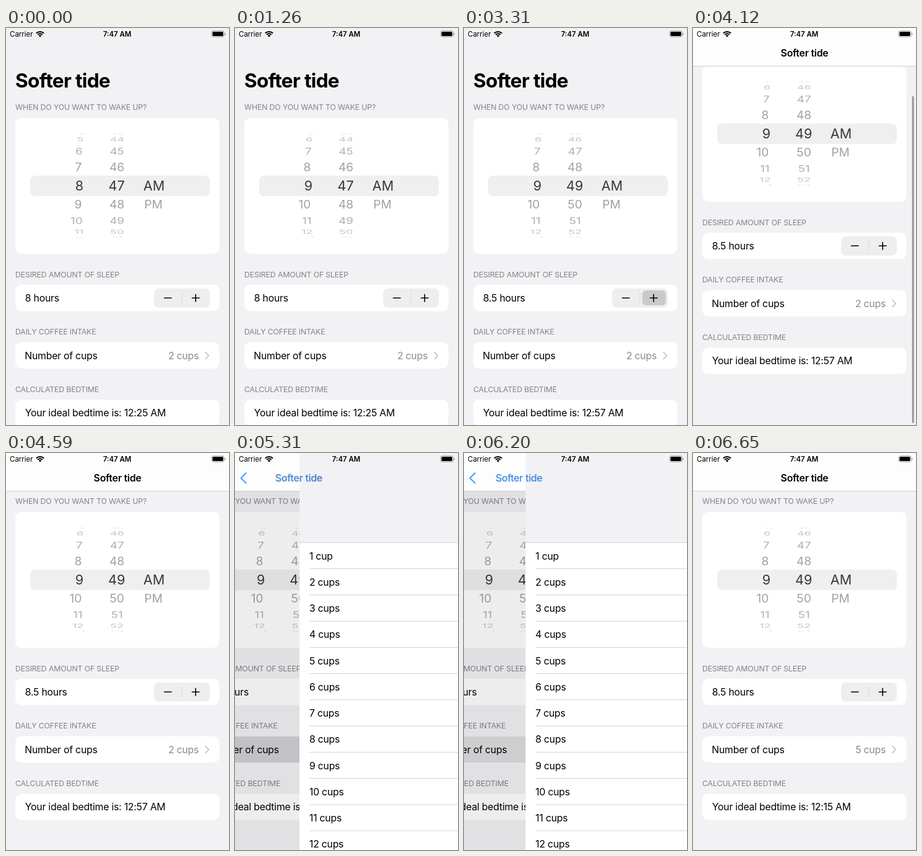
An HTML page with a canvas for the animation above (8 s loop, 360 px wide and 640 px high).

```html
<!DOCTYPE html>
<html lang="en">
<head>
<meta charset="utf-8">
<title>Sleep planner</title>
<style>
  html, body { margin: 0; width: 100%; height: 100%; overflow: hidden; background: #f2f2f5; }
  canvas { display: block; width: 360px; height: 640px; }
</style>
</head>
<body>
<canvas id="stage"></canvas>
<script>
const W = 360, H = 640, LOOP = 8000;
const TITLE = 'Softer tide';
const BG = '#f2f2f5', BLUE = '#007aff', LABEL = '#838387', LINE = '#c8c8cb';
const canvas = document.getElementById('stage');
const ctx = canvas.getContext('2d');
const dpr = window.devicePixelRatio || 1;
canvas.width = W * dpr;
canvas.height = H * dpr;

// Bursts of motion: first step, last step, number of steps
const BURSTS = [
  [710, 1260, 6], [1580, 2060, 5], [2970, 3550, 6], [3730, 3940, 3],
  [4120, 4450, 4], [4590, 4590, 1], [5090, 5650, 6], [6090, 6650, 6]
];

const clamp = v => Math.min(1, Math.max(0, v));
const lerp = (a, b, u) => a + (b - a) * u;
const ease = (t, a, b) => {
  const u = clamp((t - a) / (b - a));
  return u * u * (3 - 2 * u);
};
const spring = ms => {
  const z = Math.max(0, ms) * 0.0136;
  return 1 - (1 + z) * Math.exp(-z);
};

function snap(t) {
  let held = 0;
  for (const [a, b, n] of BURSTS) {
    for (let i = 0; i < n; i++) {
      const at = Math.floor((a + i * (b - a) / (n - 1 || 1)) / 10) * 10;
      if (at <= t) held = at;
    }
  }
  return held;
}

function scrollAt(t) {
  if (t < 3730) return 0;
  if (t < 4120) return 90 * ease(t, 3620, 3940);
  return t < 4450 ? 50 + 34 * Math.exp((4120 - t) / 100) : 50;
}

function bedtimeAt(t) {
  if (t < 1580) return '12:25';
  if (t < 1940) return '1:25';
  if (t < 3200) return '1:27';
  return t < 6090 ? '12:57' : '12:15';
}

function pushAt(t) {
  if (t < 5650) return spring(t - 5127);
  return t < 6650 ? 1 - spring(t - 6124) : 0;
}

// cy is the middle of the capital letters
function text(str, x, cy, size, { color = '#000', weight = 400, align = 'left', gap = 0 } = {}) {
  ctx.font = `${weight} ${size}px Inter, Roboto, sans-serif`;
  ctx.letterSpacing = gap + 'px';
  ctx.textAlign = align;
  ctx.fillStyle = color;
  ctx.fillText(str, x, cy + size * 0.364);
}

const body = (str, x, cy, opts) => text(str, x, cy, 15.8, { gap: -0.23, ...opts });
const heading = (str, cy) => text(str, 15, cy, 12.3, { color: LABEL, gap: -0.15 });

function rect(x, y, w, h, color) {
  ctx.fillStyle = color;
  ctx.fillRect(x, y, w, h);
}

function round(x, y, w, h, r, color) {
  ctx.fillStyle = color;
  ctx.beginPath();
  ctx.roundRect(x, y, w, h, r);
  ctx.fill();
}

function stroke(points, width, color) {
  ctx.strokeStyle = color;
  ctx.lineWidth = width;
  ctx.lineCap = ctx.lineJoin = 'round';
  ctx.beginPath();
  points.forEach(([x, y]) => ctx.lineTo(x, y));
  ctx.stroke();
}

function clipped(x, y, w, h, draw) {
  ctx.save();
  ctx.beginPath();
  ctx.rect(x, y, w, h);
  ctx.clip();
  draw();
  ctx.restore();
}

function faded(alpha, draw) {
  ctx.save();
  ctx.globalAlpha *= clamp(alpha);
  draw();
  ctx.restore();
}

// One column on a cylinder; the band in the middle shows larger, darker text
function wheel(cy, pos, label, x, bandX, align) {
  const R = 83.6, STEP = 0.367, MID = 184;
  const first = Math.ceil(pos - 4.2), last = Math.floor(pos + 4.2);
  const rows = (size, baseX, inBand) => {
    for (let k = first; k <= last; k++) {
      const str = label(k);
      const a = (k - pos) * STEP;
      if (!str || Math.abs(a) > 1.53) continue;
      const depth = inBand ? 1 : 1 - R * (1 - Math.cos(a)) * 0.0012;
      const alpha = inBand ? 0.77 : 0.1 + 0.29 * Math.cos(a);
      ctx.save();
      ctx.translate(MID + (baseX - MID) * depth, cy + R * Math.sin(a));
      ctx.scale(depth, Math.cos(a));
      text(str, 0, 0, size, { color: `rgba(0,0,0,${alpha})`, align });
      ctx.restore();
    }
  };
  clipped(0, cy - 16.5, W, 33, () => rows(21.6, bandX, true));
  clipped(0, cy - 85, W, 68.5, () => rows(19.3, x, false));
  clipped(0, cy + 16.5, W, 68.5, () => rows(19.3, x, false));
}

function picker(t, y) {
  const cy = y + 109.6;
  round(15, y, 329.5, 219, 9.6, '#fff');
  round(39, cy - 16.5, 290, 33, 7.5, '#efeff0');
  wheel(cy, 8 + ease(t, 600, 1260), k => String((k + 11) % 12 + 1), 122, 125.2, 'right');
  wheel(cy, 47 + 2 * ease(t, 1460, 2060), k => String(k % 60).padStart(2, '0'), 179, 178.7, 'center');
  wheel(cy, 0, k => ['AM', 'PM'][k], 238.5, 239, 'center');
}

function stepper(t, cy) {
  round(239, cy - 15.5, 90, 31, 7.7, '#eeeeef');
  rect(283.5, cy - 8.5, 1, 17, '#d6d6d9');
  const press = Math.min(clamp((t - 2860) / 220), clamp(1 - (t - 3310) / 240));
  if (press > 0) faded(press, () => round(287.8, cy - 12.2, 38, 24, 6, '#c9c9cc'));
  stroke([[255.5, cy], [267, cy]], 1.6, '#000');
  stroke([[300.5, cy], [312, cy]], 1.6, '#000');
  stroke([[306.2, cy - 5.8], [306.2, cy + 5.8]], 1.6, '#000');
}

function formPage(t, off, push) {
  ctx.save();
  ctx.translate(-0.3 * W * push, 0);
  rect(0, 0, W * 2, H, BG);
  const card = y => round(15, y, 329.5, 42.3, 9.6, '#fff');

  ctx.save();
  ctx.translate(0, -off);
  heading('WHEN DO YOU WANT TO WAKE UP?', 128);
  picker(t, 145);

  heading('DESIRED AMOUNT OF SLEEP', 397.3);
  card(414);
  body(`${t < 3080 ? '8' : '8.5'} hours`, 30.8, 435.5);
  stepper(t, 435.3);

  heading('DAILY COFFEE INTAKE', 490);
  card(506.7);
  const lit = t >= 5090 && t < 6650 ? (t < 6090 ? 1 : push) : 0;
  if (lit) faded(lit, () => round(15, 506.7, 329.5, 42.3, 9.6, '#d1d1d5'));
  body('Number of cups', 30.3, 528);
  body(`${t < 6090 ? 2 : 5} cups`, 311, 528, { color: '#8a8a8e', align: 'right' });
  stroke([[322, 522.7], [327.3, 528], [322, 533.3]], 1.7, '#c2c2c5');

  heading('CALCULATED BEDTIME', 582.3);
  card(599.2);
  body(`Your ideal bedtime is: ${bedtimeAt(t)} AM`, 30.8, 620.5);
  ctx.restore();

  if (push > 0) rect(0, 0, W * 2, H, `rgba(0,0,0,${0.1 * push})`);
  ctx.restore();

  if (off > 40) {
    rect(0, 0, W, 61.4, '#fdfdfe');
    rect(0, 61.2, W, 0.8, LINE);
  } else {
    rect(0, 0, W, 61.4, BG);
    const showTitle = () => text(TITLE, 15, 84 - off, 31.6, { weight: 700, gap: -0.7 });
    off > 0 ? clipped(0, 61.4, W, H, showTitle) : showTitle();
  }
}

function scrollBar(t, off) {
  if (t < 3730 || t >= 4590) return;
  const top = off < 50 ? Math.max(67, 119 - off) : 67 + (off - 50) * 1.26;
  const bottom = 597 + 40 * clamp(off / 50);
  round(353.7, top, 3, bottom - top, 1.5, 'rgba(0,0,0,0.38)');
}

function listPage(t, push) {
  const ROW = 42.24, TOP = 144.4;
  ctx.save();
  ctx.translate(W * (1 - push), 0);
  rect(0, 0, W, H, BG);
  rect(0, TOP, W, H - TOP, '#fff');
  rect(0, TOP - 0.5, W, 0.8, LINE);
  for (let i = 0; i < 12; i++) {
    const cy = TOP + ROW * (i + 0.5) + 0.5;
    body(`${i + 1} cup${i ? 's' : ''}`, 15.7, cy);
    rect(15.7, TOP + ROW * (i + 1) - 0.4, W, 0.8, LINE);
    if (i === (t < 6090 ? 1 : 4)) {
      stroke([[331, cy], [335, cy + 4.5], [342, cy - 5.5]], 1.9, BLUE);
    }
  }
  ctx.restore();
}

function navTitle(t, off, push) {
  if (off <= 40) return;
  const slide = Math.pow(push, t < 5650 ? 1.16 : 0.7);
  const mid = lerp(180, 65.5, slide);
  if (push < 1) {
    faded(1 - slide, () => body(TITLE, mid, 40.5, { weight: 600, align: 'center' }));
  }
  if (push > 0) {
    faded(slide, () => body(TITLE, mid, 40.5, { color: BLUE, align: 'center' }));
    faded(push, () => stroke([[17.8, 32.3], [9.6, 40.4], [17.8, 48.5]], 2.1, BLUE));
  }
}

function statusBar() {
  text('Carrier', 6, 10, 11.5);
  text('7:47 AM', 179.5, 10, 11.4, { weight: 600, align: 'center' });

  ctx.strokeStyle = ctx.fillStyle = '#000';
  ctx.lineCap = 'butt';
  ctx.lineWidth = 2;
  const from = -Math.PI * 0.75, to = -Math.PI * 0.25;
  for (const r of [8.7, 5.4]) {
    ctx.beginPath();
    ctx.arc(55, 14.7, r, from, to);
    ctx.stroke();
  }
  ctx.beginPath();
  ctx.moveTo(55, 14.7);
  ctx.arc(55, 14.7, 3.2, from, to);
  ctx.fill();

  ctx.strokeStyle = 'rgba(0,0,0,0.4)';
  ctx.lineWidth = 0.9;
  ctx.beginPath();
  ctx.roundRect(332, 4.6, 20, 9.8, 2.6);
  ctx.stroke();
  round(333.4, 6, 17.2, 7, 1.5, '#000');
  round(353, 8, 1.3, 3.4, 0.7, 'rgba(0,0,0,0.4)');
}

function draw(now) {
  const t = snap(now % LOOP);
  const off = scrollAt(t), push = pushAt(t);
  ctx.setTransform(dpr, 0, 0, dpr, 0, 0);
  ctx.globalAlpha = 1;
  formPage(t, off, push);
  scrollBar(t, off);
  if (push > 0) listPage(t, push);
  navTitle(t, off, push);
  statusBar();
}

let start = null;
function tick(now) {
  if (start === null) start = now;
  draw(now - start);
  requestAnimationFrame(tick);
}
draw(0);
requestAnimationFrame(tick);
</script>
</body>
</html>
```
